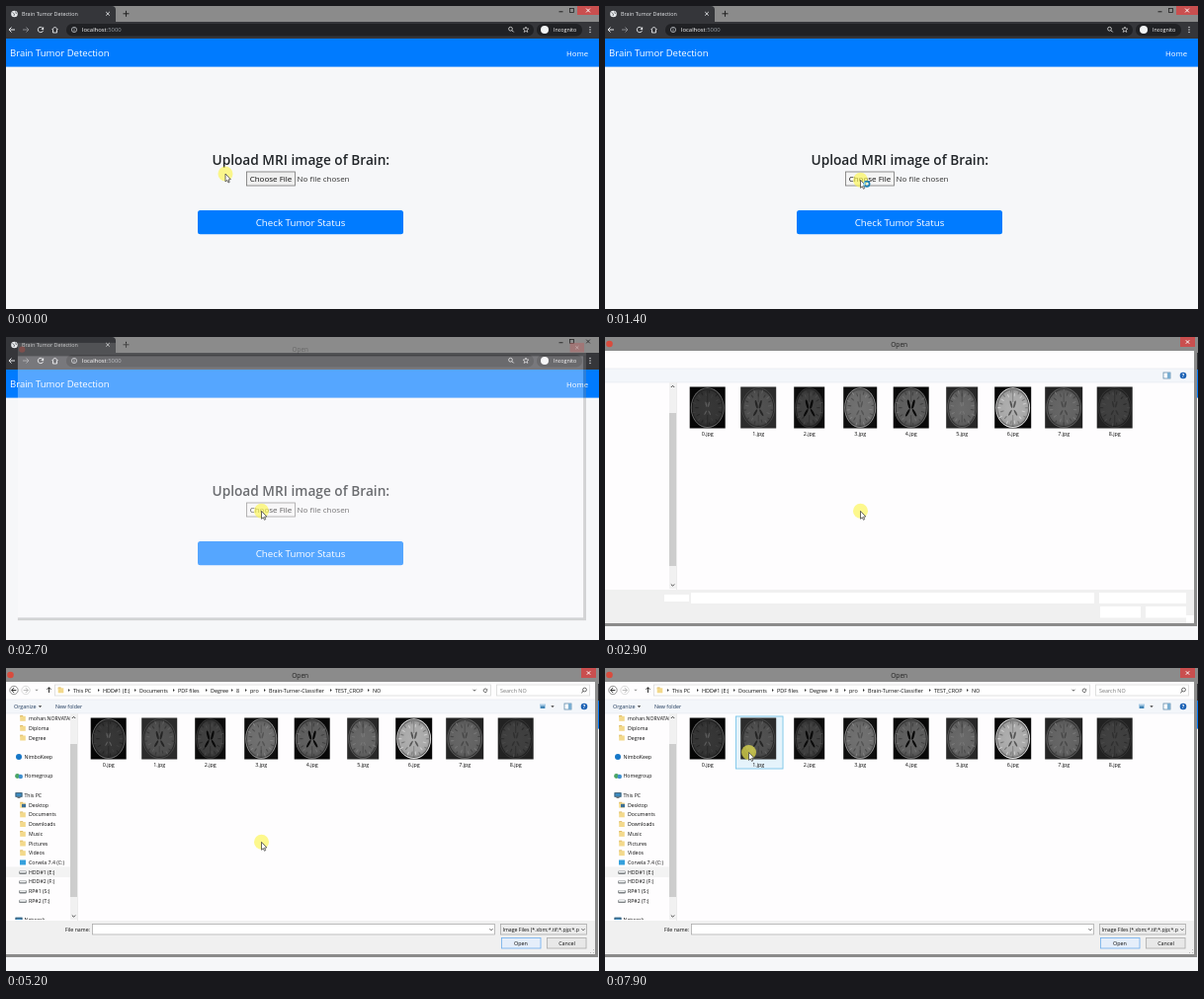
An HTML page with a canvas that plays this animation: 600 px wide and 307 px high, repeating every 8000 ms.

```html
<!DOCTYPE html>
<html lang="en">
<head>
<meta charset="utf-8">
<title>Brain Tumor Detection</title>
<style>
html, body { margin: 0; width: 100%; height: 100%; overflow: hidden; background: #f6f7f9; }
canvas { display: block; width: 600px; height: 307px; }
</style>
</head>
<body>
<canvas id="stage"></canvas>
<script>
const W = 600, H = 307, LOOP = 8000, STEP = 100;
const GRAY = '#8b8b8b', INK = '#0c0c0c';
const canvas = document.getElementById('stage');
const ratio = window.devicePixelRatio || 1;
canvas.width = W * ratio;
canvas.height = H * ratio;
const c = canvas.getContext('2d');

const clamp = v => Math.max(0, Math.min(1, v));
const ramp = (t, a, b) => clamp((t - a) / (b - a));
const ease = p => p * p * (3 - 2 * p);
const mix = (a, b, p) => a + (b - a) * p;

function rect(x, y, w, h, fill, stroke) {
  if (fill) { c.fillStyle = fill; c.fillRect(x, y, w, h); }
  if (stroke) {
    c.strokeStyle = stroke;
    c.lineWidth = 0.8;
    c.strokeRect(x + 0.5, y + 0.5, w - 1, h - 1);
  }
}

function pill(x, y, w, h, r, fill) {
  c.fillStyle = fill;
  c.beginPath();
  c.roundRect(x, y, w, h, r);
  c.fill();
}

function oval(x, y, rx, ry, fill, turn = 0) {
  c.fillStyle = fill;
  c.beginPath();
  c.ellipse(x, y, rx, ry, turn, 0, 7);
  c.fill();
}

const dot = (x, y, r, fill) => oval(x, y, r, r, fill);

function ring(x, y, r, color, width = 0.8, from = 0, to = Math.PI * 2) {
  c.strokeStyle = color;
  c.lineWidth = width;
  c.beginPath();
  c.arc(x, y, r, from, to);
  c.stroke();
}

// Polylines, each a flat list of x, y pairs.
function lines(color, width, ...paths) {
  c.strokeStyle = color;
  c.lineWidth = width;
  c.beginPath();
  for (const p of paths) {
    c.moveTo(p[0], p[1]);
    for (let i = 2; i < p.length; i += 2) c.lineTo(p[i], p[i + 1]);
  }
  c.stroke();
}

function shape(fill, ...p) {
  c.fillStyle = fill;
  c.beginPath();
  for (let i = 0; i < p.length; i += 2) c.lineTo(p[i], p[i + 1]);
  c.closePath();
  c.fill();
}

function text(str, x, y, size, color = INK, align = 'left', weight = 400) {
  c.font = `${weight} ${size}px "Open Sans", "Noto Sans", sans-serif`;
  c.textAlign = align;
  c.textBaseline = 'alphabetic';
  c.fillStyle = color;
  c.fillText(str, x, y);
}

function cross(x, y, r, color, width = 1) {
  lines(color, width, [x - r, y - r, x + r, y + r], [x + r, y - r, x - r, y + r]);
}

function arrow(x, y, dir, color, r = 3) {
  lines(color, 1, [x - r, y, x + r, y], [x + dir * (r - 2.5), y - 2.5, x + dir * r, y, x + dir * (r - 2.5), y + 2.5]);
}

function chevron(x, y, color = '#444', r = 1.5) {
  lines(color, 0.9, [x - r, y - r / 2, x, y + r / 2, x + r, y - r / 2]);
}

const caret = (x, y, color = '#333') => shape(color, x - 1.7, y - 0.8, x + 1.7, y - 0.8, x, y + 1.1);

function lens(x, y, color, side = 1) {
  ring(x - side * 0.5, y - 0.5, 1.9, color);
  lines(color, 1, [x + side, y + 1, x + side * 2.7, y + 2.7]);
}

function reload(x, y, r, color) {
  ring(x, y, r, color, 0.9, 0.3, 5.4);
  shape(color, x + r + 0.4, y - r - 0.3, x + r + 0.4, y, x + 0.3, y - 0.3);
}

function star(x, y, r) {
  const p = [];
  for (let i = 0; i <= 10; i++) {
    const a = i * Math.PI / 5, q = i % 2 ? r * 0.45 : r;
    p.push(x + q * Math.sin(a), y - q * Math.cos(a));
  }
  lines('#ddd', 0.7, p);
}

function browser(t) {
  rect(0, 0, W, 17, GRAY);
  pill(0, 0, 111, 20, [0, 4, 0, 0], '#35363a');
  rect(0, 16, W, 17, '#35363a');
  dot(8.5, 8, 3.3, '#e8eaed');
  lines('#55575c', 0.8, [6.5, 6.5, 8.5, 8, 8, 10], [9.5, 5.5, 10.5, 8]);
  text('Brain Tumor Detection', 16, 10, 5.4, '#e8eaed');
  cross(103, 7.8, 1.8, '#e8eaed', 0.9);
  lines('#222', 1, [118.5, 7.8, 124.5, 7.8], [121.5, 4.8, 121.5, 10.8]);

  const focus = 1 - ramp(t, 1800, 2200);
  lines('#222', 1, [559.5, 5.8, 563.5, 5.8]);
  rect(570, 2, 5, 5, null, '#222');
  c.globalAlpha = focus;
  rect(578, 0, 22, 9, '#c94f4f');
  c.globalAlpha = 1;
  cross(589, 4.5, 1.9, focus > 0.5 ? '#fff' : '#333');

  arrow(6, 24, -1, '#e8eaed');
  arrow(20, 24, 1, '#85878b');
  reload(35, 24, 2.7, '#e8eaed');
  lines('#e8eaed', 0.9, [46.5, 24, 49.5, 21, 52.5, 24], [47.5, 23.5, 47.5, 27, 51.5, 27, 51.5, 23.5]);
  pill(61, 18, 473, 12.5, 6, '#202124');
  ring(69, 24, 2.6, '#bdc1c6');
  lines('#bdc1c6', 0.8, [69, 23.5, 69, 25.6], [69, 22.2, 69, 22.9]);
  text('localhost', 77, 26.2, 5.9, '#fff');
  const end = 77 + c.measureText('localhost').width;
  text(':5000', end, 26.2, 5.9, '#9aa0a6');
  lens(511, 23.7, '#ddd');
  star(526, 24, 3);
  pill(537, 18, 46, 12.5, 6, '#202124');
  dot(545, 24, 4, '#f1f3f4');
  text('Incognito', 554, 26, 5.35, '#fff');
  for (const y of [21.5, 24, 26.5]) dot(591, y, 0.7, '#e8eaed');
}

function page(t) {
  rect(0, 33, W, H - 33, '#f6f7f9');
  rect(0, 33, W, 28.6, '#007bff');
  text('Brain Tumor Detection', 4, 51, 9.55, '#fff');
  text('Home', 567, 50.6, 7.8, '#fff');
  text('Upload MRI image of Brain:', 298.3, 160.5, 13.7, '#212529', 'center', 600);
  rect(243, 167.5, 50, 15, t > 700 ? '#f4f4f4' : '#efefef', '#767676');
  text('Choose File', 268, 178, 8, '#111', 'center');
  text('No file chosen', 294.5, 178, 8, '#333');
  pill(194, 207, 208, 24.3, 2.5, '#007bff');
  text('Check Tumor Status', 298, 222.7, 9.75, '#fff', 'center');
}

// Picture width, then grays of backdrop, tissue, rim and cavity, and cavity size
const scans = [
  [36, 6, 52, 100, 92, 0.6], [36, 44, 78, 70, 36, 0.9], [31, 12, 62, 50, 10, 1],
  [34, 14, 108, 140, 84, 0.7], [36, 8, 92, 104, 8, 1], [32, 40, 100, 88, 120, 0.5],
  [37, 8, 168, 225, 84, 0.8], [38, 36, 98, 92, 72, 0.7], [36, 34, 62, 52, 48, 0.7]
];
const gray = v => `rgb(${v},${v},${v})`;

function scan(x, i) {
  const [w, back, tissue, rim, cavity, size] = scans[i], y = 71.7;
  const rx = w * 0.47, ry = 20.4;
  rect(x - w / 2, 50.5, w, 42, gray(back));
  oval(x, y, rx, ry, gray(rim));
  oval(x, y, rx - 0.9, ry - 1, gray(tissue * 0.5));
  const g = c.createRadialGradient(x, y, 2, x, y, ry);
  g.addColorStop(0, gray(tissue * 1.05));
  g.addColorStop(0.65, gray(tissue));
  g.addColorStop(1, gray(tissue * 0.8));
  oval(x, y, rx - 1.8, ry - 2, g);
  // folds along the edge
  for (let k = 0; k < 22; k++) {
    const a = k * Math.PI / 11 + i, p = 0.74 + 0.1 * Math.sin(k * 2.7 + i);
    oval(x + rx * p * Math.cos(a), y + ry * p * Math.sin(a), 2, 0.6, gray(tissue * (k % 2 ? 0.72 : 1.2)), a);
  }
  lines(gray(tissue * 0.65), 0.6, [x, 54, x, 66], [x, 79, x, 90]);
  for (const s of [-1, 1]) {
    oval(x + s * 2.2 * size, y - 3.5, 1.2 * size, 4.8 * size, gray(cavity), s * 0.25);
    oval(x + s * 3.4 * size, y + 5, 1.1 * size, 4.2 * size, gray(cavity), -s * 0.5);
  }
}

function files(hover) {
  if (hover) rect(132, 48.5, 48.5, 54, '#e5f3fb', '#70c0e7');
  scans.forEach((s, i) => {
    const x = 103.7 + i * 51.5;
    scan(x, i);
    text(i + '.jpg', x, 99.8, 5.4, INK, 'center');
  });
}

function folder(x, y) {
  rect(x - 2.8, y - 3, 3, 2, '#d9b45c');
  rect(x - 2.8, y - 2.2, 5.6, 5, '#f3d98c');
}

const tree = [
  ['mohan.NORVATABL', 51, 'folder'], ['Diploma', 61, 'folder'], ['Degree', 70.7, 'folder'],
  ['NimboKeep', 90, 'cloud'], ['Homegroup', 109.5, 'group'], ['This PC', 129, 'pc'],
  ['Desktop', 138.8, 'desk'], ['Documents', 148.5, 'folder'], ['Downloads', 158.2, 'folder'],
  ['Music', 168, 'folder'], ['Pictures', 177.7, 'folder'], ['Videos', 187.4, 'folder'],
  ['Corvela 7.4 (C:)', 197, 'system'], ['HDD#1 (E:)', 206.8, 'drive'], ['HDD#2 (F:)', 216.5, 'drive'],
  ['RP#1 (S:)', 226.3, 'drive'], ['RP#2 (T:)', 236, 'drive'], ['Network', 255.5, 'pc']
];
const icons = {
  folder,
  cloud: (x, y) => dot(x, y, 3, '#1677c8'),
  group(x, y) {
    dot(x - 1.5, y, 2.4, '#4aa564');
    dot(x + 1.8, y + 0.5, 2.2, '#3f8fd0');
  },
  pc(x, y) {
    rect(x - 3.5, y - 2.8, 7, 4.5, '#3b8ec7', '#45565f');
    rect(x - 1.5, y + 2, 3, 1, '#777');
  },
  desk(x, y) {
    folder(x, y);
    rect(x - 1, y - 1, 4, 3.4, '#3c6f96');
  },
  system: (x, y) => rect(x - 3, y - 2.5, 6, 5, '#35a0dc'),
  drive(x, y) {
    pill(x - 3.8, y - 1.3, 7.6, 3.4, 1.2, '#7c8083');
    pill(x - 3.2, y - 1.1, 6.4, 1.8, 0.8, '#eceeef');
  }
};

function sidebar() {
  rect(0, 201.5, 65, 10.5, '#f3f3f3');
  c.save();
  c.beginPath();
  c.rect(0, 46, 65, 209);
  c.clip();
  for (const [name, y, kind] of tree) {
    const root = ['cloud', 'group', 'pc'].includes(kind);
    icons[kind](root ? 13 : 17, y);
    text(name, root ? 18.5 : 23, y + 1.9, 5.2);
  }
  c.restore();
}

function scrollbar() {
  rect(65, 46, 7, 209, '#f1f1f1');
  rect(65, 77, 7, 155, '#cdcdcd');
  lines('#444', 1, [66.8, 51, 68.5, 49.3, 70.2, 51], [66.8, 250.5, 68.5, 252.2, 70.2, 250.5]);
}

const crumbs = [
  ['This PC', 68], ['HDD#1 (E:)', 98], ['Documents', 135], ['PDF files', 174], ['Degree', 207],
  ['8', 233], ['pro', 247], ['Brain-Turner-Classifier', 266], ['TEST_CROP', 333], ['NO', 371]
];

function addressBar(t) {
  const active = t >= 5100;
  ring(8, 22.5, 4.2, active ? '#666' : '#ccc', 0.7);
  arrow(8, 22.5, -1, active ? '#333' : '#bbb', 2.3);
  ring(20, 22.5, 4.2, '#ccc', 0.7);
  arrow(20, 22.5, 1, '#bbb', 2.3);
  caret(31, 22.5, '#999');
  lines('#333', 1, [43.5, 25, 43.5, 19.7], [41.5, 21.8, 43.5, 19.7, 45.5, 21.8]);
  rect(49, 16.5, 442, 12, '#fff', '#d9d9d9');
  folder(55.5, 22.5);
  for (const [name, x] of crumbs) {
    shape('#333', x - 5, 20.9, x - 3.3, 22.5, x - 5, 24.1);
    text(name, x, 24.5, 5.4);
  }
  chevron(474, 22.5);
  reload(485, 22.8, 1.8, '#555');
  rect(496, 16.5, 95, 12, '#fff', '#d9d9d9');
  text('Search NO', 500, 24.5, 5.4, '#777');
  lens(585, 22.5, '#444', -1);
}

function bottomBar(ready) {
  rect(0, 256, 596, 34, '#f0f0f0');
  if (!ready) {
    rect(60, 261, 25, 7, '#fff');
    rect(87, 259, 408, 11, '#fff');
    rect(500, 259, 88, 11, '#fff');
    rect(501, 273, 41, 11.5, '#fff');
    rect(547, 273, 41, 11.5, '#fff');
    rect(588, 282, 8, 8, '#fff');
    return;
  }
  text('File name:', 85, 267, 5.25, INK, 'right');
  rect(87, 259, 408, 11.5, '#fff', '#ababab');
  chevron(491, 265);
  rect(500, 259, 88, 11.5, '#ececec', '#ababab');
  text('Image Files (*.xbm;*.tif;*.pjp;*.p', 502.5, 266.8, 5.2);
  chevron(584, 265);
  rect(501, 273, 40.5, 11.5, '#e5eefa', '#6fadea');
  text('Open', 521, 280.8, 5.4, INK, 'center');
  rect(547, 273, 40.5, 11.5, '#e8e8e8', '#acacac');
  text('Cancel', 567.5, 280.8, 5.4, INK, 'center');
  for (const [x, y] of [[594, 285], [594, 288], [591, 288]]) rect(x, y, 1, 1, '#bbb');
}

function toolbar(ready) {
  rect(0, 32, 596, 14, '#f3f6fa');
  lines('#e2e6ec', 0.6, [0, 32, 596, 32], [0, 46, 596, 46]);
  rect(564.5, 35.5, 8, 7, '#fff', '#5b87a8');
  rect(569, 36, 3, 6, '#79aed2');
  dot(585, 39, 3.3, '#1c62b5');
  text('?', 585, 41, 5.2, '#fff', 'center', 700);
  if (!ready) return;
  text('Organize', 8, 41, 5.4, '#1e395b');
  caret(34.5, 39);
  text('New folder', 50, 41, 5.3, '#1e395b');
  rect(540, 36.5, 6, 4.5, '#a9cbe5');
  rect(541, 38.5, 4, 2.5, '#4385b5');
  caret(553, 39);
}

function dialog(t, hover) {
  const ready = t >= 3100;
  const show = ramp(t, 2600, 2900);
  c.save();
  c.globalAlpha = show;
  const s = mix(0.94, 1, show);
  c.translate(298, 147);
  c.scale(s, s);
  c.translate(-298, -147);
  rect(0, 0, 599, 14, GRAY);
  rect(596, 14, 3, 279, GRAY);
  rect(0, 290, 596, 3, GRAY);
  rect(0, 14, 596, 276, '#fefdfe');
  dot(4.5, 7, 3.3, '#d94b3d');
  text('Open', 297.7, 9.8, 6.6, '#222', 'center');
  rect(582, 0, 15, 10, '#c94f4f');
  cross(589.5, 5, 1.7, '#fff');
  if (show === 1) {
    toolbar(ready);
    if (ready) addressBar(t);
    files(hover);
    if (t >= 3300) sidebar();
    scrollbar();
    lines('#e8e8e8', 0.8, [72.5, 46, 72.5, 256]);
    bottomBar(ready);
  }
  c.restore();
}

function pointer(x, y) {
  const p = [x, y, x, y + 8, x + 1.8, y + 6.4, x + 3, y + 9, x + 4.2, y + 8.4, x + 3.1, y + 5.9, x + 5.3, y + 5.7];
  shape('#fff', ...p);
  lines('#444', 0.8, [...p, x, y]);
}

function draw(time) {
  const t = Math.floor(time % LOOP / STEP) * STEP;
  const go = ease(ramp(t, 0, 900)), pick = ease(ramp(t, 7200, 7900));
  const x = mix(mix(222, 258.5, go), 145.5, pick);
  const y = mix(mix(170, 176.3, go), 85.5, pick);
  const hover = pick > 0 && x < 180 && y < 102;

  c.setTransform(ratio, 0, 0, ratio, 0, 0);
  browser(t);
  page(t);
  if (t >= 2700) dialog(t, hover);
  c.globalAlpha = 0.65;
  dot(x, y, 7.5, '#fcf650');
  c.globalAlpha = 1;
  pointer(x, y);
  if (t >= 1100 && t < 2200) {
    ring(x + 6.5, y + 4, 2.6, '#1d7fb0', 1.7);
    const a = t / 160;
    ring(x + 6.5, y + 4, 2.6, '#8fd6ee', 1.3, a, a + 1.6);
  }
}

function tick() {
  draw(performance.now());
  requestAnimationFrame(tick);
}
tick();
</script>
</body>
</html>
```
